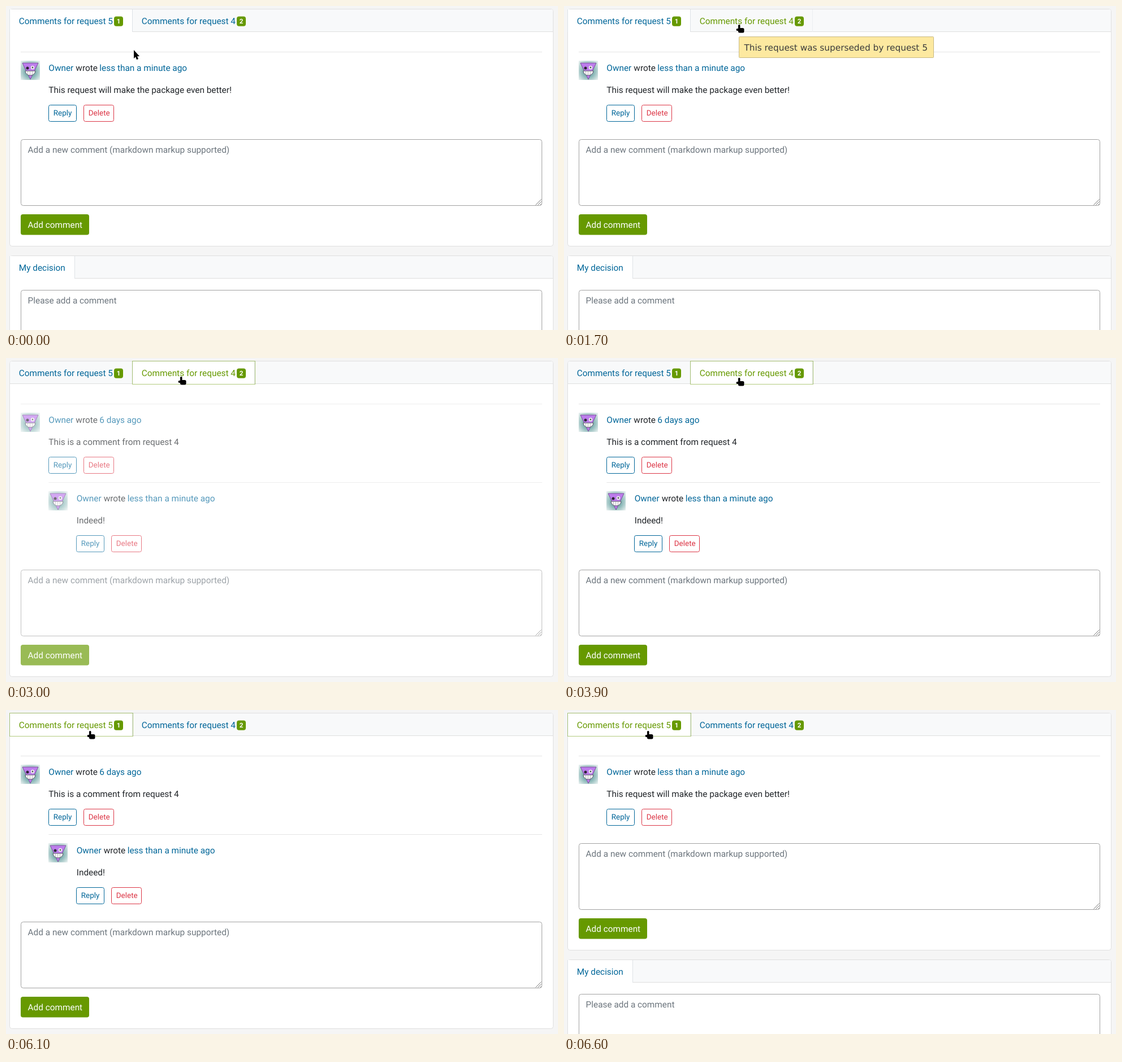
An HTML page with a canvas that plays this animation: 976x574 px, repeating every 7.5 s.

```html
<!DOCTYPE html>
<html lang="en">
<head>
<meta charset="utf-8">
<title>Request comments</title>
<style>
html, body { margin: 0; width: 100%; height: 100%; overflow: hidden; background: #f5f5f5; }
canvas { display: block; }
</style>
</head>
<body>
<canvas id="stage" width="976" height="574"></canvas>
<script>
const ctx = document.getElementById('stage').getContext('2d');
const LOOP = 7500, STEP = 100;
const REM = 15.36;
const BLUE = '#006699', GREEN = '#669900', RED = '#dc3545', INK = '#212529', MUTED = '#6c757d';
const roboto = (scale, weight = '') => `${weight} ${REM * scale}px Roboto, sans-serif`;
const BODY = roboto(1), SMALL = roboto(.875), BADGE = roboto(.75, 'bold');
const TIP = '15.3px "DejaVu Sans", sans-serif';

const TABS = [
  { label: 'Comments for request 5', count: '1', x: 6, width: 218 },
  { label: 'Comments for request 4', count: '2', x: 223, width: 217 }
];
const MOVES = [
  { start: 700, steps: 6, x: 310, y: 34 },
  { start: 3900, steps: 6, x: 302, y: 95 },
  { start: 5200, steps: 3, x: 155, y: 43 },
  { start: 5700, steps: 1, x: 149, y: 38 }
];
// The old pane fades down to "low", then the panes swap and the new one fades in
const FADES = [
  { start: 2800, swap: 2900, low: .12 },
  { start: 6100, swap: 6400, low: .33 }
];

function text(str, x, y, color = INK, font = BODY) {
  ctx.font = font;
  ctx.textRendering = 'geometricPrecision';
  ctx.fillStyle = color;
  ctx.fillText(str, x, y);
}

function rect(x, y, w, h, color) {
  ctx.fillStyle = color;
  ctx.fillRect(x, y, w, h);
}

function box(x, y, w, h, radius, fill, stroke) {
  ctx.beginPath();
  if (stroke) ctx.roundRect(x + .5, y + .5, w - 1, h - 1, radius);
  else ctx.roundRect(x, y, w, h, radius);
  paint(fill, stroke);
}

function paint(fill, stroke) {
  if (fill) { ctx.fillStyle = fill; ctx.fill(); }
  if (stroke) { ctx.lineWidth = 1; ctx.strokeStyle = stroke; ctx.stroke(); }
}

function disc(x, y, r, color) {
  ctx.beginPath();
  ctx.arc(x, y, r, 0, 2 * Math.PI);
  paint(color);
}

function at(x, y, draw) {
  ctx.save();
  ctx.translate(x, y);
  draw();
  ctx.restore();
}

function avatar(x, y) {
  at(x, y, () => {
    const glow = ctx.createRadialGradient(17, 20, 6, 17, 17, 23);
    glow.addColorStop(0, '#6ba5a5');
    glow.addColorStop(1, '#e6efee');
    rect(0, 0, 34, 34, glow);

    ctx.beginPath();
    ctx.moveTo(3, 4);
    ctx.lineTo(31, 4);
    ctx.lineTo(17, 33);
    ctx.closePath();
    paint('#bd7cec', '#76539a');

    disc(12, 13, 2.5, '#2b2433');
    disc(21, 12, 3.2, '#f0f0f0');
    disc(21, 12, 1.4, '#55505f');

    ctx.beginPath();
    ctx.ellipse(17, 18, 9, 8, 0, 0, Math.PI);
    ctx.closePath();
    paint('#f6f6f6', '#5d566b');
    for (let tooth = 12; tooth < 24; tooth += 4) rect(tooth, 18, .6, 7, '#9c98a6');
  });
}

function outlineButton(label, x, y, width, color) {
  box(x, y, width, 30, 3, null, color);
  text(label, x + 8.8, y + 19, color, SMALL);
}

function comment(x, y, when, message) {
  const left = x + 34 + REM;
  const buttonX = Math.floor(left);
  rect(x, y, 948 - x, 1, '#e5e5e5');
  avatar(Math.floor(x), y + 16);
  text('Owner', left, y + 34, BLUE);
  text('wrote', left + 48, y + 34);
  text(when, left + 90, y + 34, BLUE);
  text(message, left, y + 73);
  outlineButton('Reply', buttonX, y + 94, 50, BLUE);
  outlineButton('Delete', buttonX + 62, y + 94, 54, RED);
}

function textarea(y, hint) {
  box(26, y, 922, 118, 4, '#fff', '#a2a2a2');
  text(hint, 38.6, y + 24, MUTED);
  ctx.beginPath();
  for (let size = 10; size > 0; size -= 4) {
    ctx.moveTo(946.5 - size, y + 116.5);
    ctx.lineTo(946.5, y + 116.5 - size);
  }
  paint(null, '#777');
}

function card(y, height) {
  box(6, y, 962, height, 4, '#fff', '#dfdfdf');
  box(7, y + 1, 960, 40, [3, 3, 0, 0], '#f8f9fa');
  rect(7, y + 40, 960, 1, '#dfdfdf');
}

function openTab(x, y, width) {
  rect(x, y + 1, width, 40, '#dee2e6');
  rect(x + 1, y + 1, width - 2, 40, '#fff');
}

function tabs(active, hover, focus) {
  TABS.forEach(({ label, count, x, width }, i) => {
    const color = i === hover ? GREEN : BLUE;
    if (i === active) openTab(x, 5, width);
    else if (i === hover) rect(x + width - 1, 6, 1, 40, '#eceff1');
    text(label, x + 16.8, 32, color);
    box(x + 185, 18.5, 16, 17.3, 4, GREEN);
    text(count, x + 189.7, 31, '#fff', BADGE);
    if (i === focus) {
      ctx.setLineDash([1, 1]);
      box(x, 5, width + 1, 42, 0, null, color);
      ctx.setLineDash([]);
    }
  });
}

function pane(index, opacity) {
  const shift = index ? 139 : 0;
  if (index) {
    comment(26, 81, '6 days ago', 'This is a comment from request 4');
    comment(26 + 34 + REM, 220, 'less than a minute ago', 'Indeed!');
  } else {
    comment(26, 81, 'less than a minute ago', 'This request will make the package even better!');
  }
  textarea(236 + shift, 'Add a new comment (markdown markup supported)');
  box(26, 369 + shift, 121, 36.6, 4, GREEN);
  text('Add comment', 38.6, 393 + shift, '#fff');
  rect(20, 60, 935, 350 + shift, `rgba(255,255,255,${1 - opacity})`);
}

function decision() {
  card(442, 200);
  openTab(6, 442, 116);
  text('My decision', 22.8, 469, BLUE);
  textarea(503, 'Please add a comment');
}

function tooltip() {
  box(309, 54, 345, 38, 1, '#fde9a0', '#c8b983');
  text('This request was superseded by request 5', 318.5, 79, '#3b3b3b', TIP);
}

function pointerAt(t) {
  let x = 226, y = 78;
  for (const move of MOVES) {
    if (t < move.start) break;
    const p = Math.min(1, (Math.floor((t - move.start) / STEP) + 1) / move.steps);
    const eased = p * p * p * (p * (p * 6 - 15) + 10);
    x += (move.x - x) * eased;
    y += (move.y - y) * eased;
  }
  return { x: Math.round(x), y: Math.round(y) };
}

function arrowPath() {
  ctx.moveTo(0, 0);
  ctx.lineTo(0, 15);
  ctx.lineTo(3, 12);
  ctx.lineTo(5, 17);
  ctx.lineTo(8, 16);
  ctx.lineTo(6, 11);
  ctx.lineTo(10, 11);
  ctx.closePath();
}

function handPath() {
  ctx.roundRect(-2, -1, 3.5, 10, 1.5);
  ctx.roundRect(-2, 5, 10.5, 8.5, 2.5);
  ctx.roundRect(-5.5, 6, 6, 4, 2);
}

function drawPointer({ x, y }, path) {
  at(x, y, () => {
    ctx.beginPath();
    path();
    paint(null, '#fff');
    paint('#000');
  });
}

function opacityAt(t) {
  const fade = FADES.findLast(({ start }) => t >= start);
  if (!fade) return 1;
  const step = Math.floor((t - fade.swap) / STEP);
  const level = step < 0 ? fade.low - (step + 1) / 3 : (step + 1) / 3;
  return Math.min(1, level);
}

function render(t) {
  const [forth, back] = FADES;
  const between = (a, b) => t >= a && t < b;
  const mouse = pointerAt(t);
  const hover = mouse.y < 47 ? (mouse.x < 224 ? 0 : 1) : -1;
  const active = between(forth.start, back.start) ? 1 : 0;
  const shown = between(forth.swap, back.swap) ? 1 : 0;
  const focus = t < forth.start ? -1 : active;

  rect(0, 0, 976, 574, '#f5f5f5');
  card(5, shown ? 560 : 421);
  tabs(active, hover, focus);
  pane(shown, opacityAt(t));
  if (!shown) decision();
  if (between(1700, forth.start)) tooltip();
  drawPointer(mouse, hover < 0 ? arrowPath : handPath);
}

const origin = performance.now();
function tick() {
  render((performance.now() - origin) % LOOP);
  requestAnimationFrame(tick);
}
tick();
</script>
</body>
</html>
```
